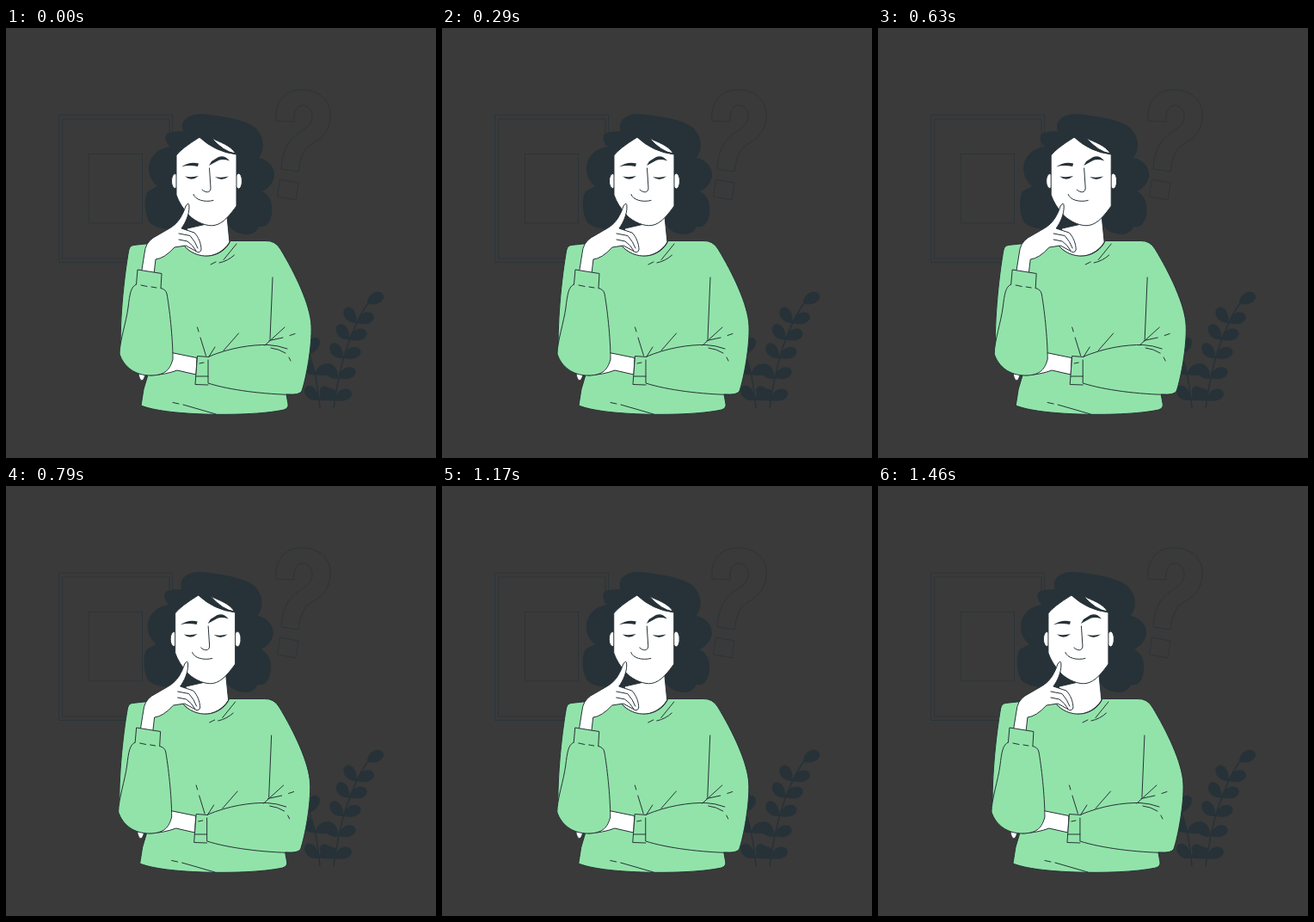
These frames come from a looping animation (500 by 500 pixels, 1.5 s). An HTML page:

```html
<!DOCTYPE html>
<html lang="en">
<head>
<meta charset="utf-8">
<title>Thinking</title>
<style>
html, body { margin: 0; height: 100%; overflow: hidden; background: #3a3a3a; }
svg { display: block; width: 100%; height: 100%; }
.back { fill: none; stroke: #263238; stroke-width: .7; }
.stem { fill: none; stroke: #263238; stroke-width: 1.5; }
.dark { fill: #263238; }
.skin { fill: #fff; }
.knit { fill: #92e3a9; }
.line { fill: none; }
#person { stroke: #263238; stroke-linecap: round; stroke-linejoin: round; }
#person .dark { stroke: none; }
</style>
</head>
<body>
<svg viewBox="0 0 500 500">
  <g class="back">
    <rect x="61.500" y="101" width="132" height="171.500"/>
    <rect x="65.500" y="106" width="124.500" height="162"/>
    <rect x="96.500" y="146.500" width="62" height="80.500"/>
    <path d="M314 108C312 86 324 71 346 72S379 88 377 105S367 128 357 134S343 147 340 167L320 164C321 140 331 128 342 121S357 108 356 101S350 89 344 90S334 97 335 109Z"/>
    <path d="M318.500 176L340 180L337 200L315.500 196Z"/>
  </g>
  <g id="plant" class="dark"></g>
  <g id="person">
    <path class="dark" d="M206 120C201 107 214 99 228 100S281 106 291 117S301 141 294 151C305 153 313 162 312 173Q309 185 298 190C310 196 311 211 308 221Q304 233 294 231C290 240 281 241 273 239Q264 237 258 229L213 234C190 236 174 233 167 226C160 214 161 196 165 190Q170 187 176 184C165 175 163 161 170 150Q178 139 191 138C184 132 184 124 189 122Q196 120 206 120Z"/>
    <path class="skin" d="M211 233L233 228L257 219L260 249C252 262 238 267 226 265Q214 262 207 253Z"/>
    <g class="skin">
      <ellipse cx="196.500" cy="178" rx="4" ry="8.500"/>
      <ellipse cx="270.500" cy="178" rx="4" ry="9"/>
      <path d="M225 127Q204 140 198 148L198 194Q202 206 213 218C221 226 234 231 242 229.500C253 228 262 215 268 207V147Q243 144 225 127Z"/>
      <path d="M239 128C249 133 261 136 267 146Q253 144 239 128Z"/>
    </g>
    <path class="dark" d="M204 161.500Q213 155 224 157.500L223 161Q212 159 204 161.500ZM236 160L239 155L247 150Q254 147 260 154.500Q252 152 247 154ZM208 172.500Q216 174 224 172Q216 179 208 172.500ZM243 173Q251 174.500 259 172.500Q251 179 243 173Z"/>
    <path class="line" d="M236.500 163L238 186C238 192 232 192 228 188M218 193.500C220 200 231 203 241 200.500"/>
    <path class="knit" d="M143 257Q144 253 148 252.500L162 251L207 253C213 261 225 266 236 265S257 257 261 247.500H302Q313 247 319 257C336 285 354 322 355 346S349 407 344 422Q342 427 326 426L328 437Q329 442 323 444C300 449 260 450 230 449S172 445 157 439L160 420L166 400L134 384C131 350 137 290 143 257Z"/>
    <path class="skin" d="M190 377L222 383.500L221 403L199 398Q186 403 168 404ZM154 402C155 409 159 415 162 403Z"/>
    <path class="knit" d="M151.500 298C145 301 144 309 142 325S132 365 132 379C137 394 150 404 168 404S191 396 194 385C194 360 190 325 187 309Q186 304 180 302.500"/>
    <path class="skin" d="M157.500 284L161 262Q162 250 171 244L190 233C201 227 206 216 209 207Q213 201 213 208C213 217 209 226 204 233L219 238C224 243 227 251 227 258Q225 263 220 259L209 253L196 255Q184 268 174 269L172 286Z"/>
    <path class="line" d="M201 239L214 241.500Q220 248 223 256M201 246L211 248Q217 252 221 259"/>
    <path class="knit" d="M151.500 298L153 281L181 285.500L180 302.500"/>
    <path class="knit" d="M236 382.500L222.500 381.500L220 414.500L235 415"/>
    <path class="line" d="M157 299L164 300.500M169 301L175 302M236 382C260 372 285 368 305 368.500Q316 369 327 373M235 386V413C260 421 300 426 335 426.500M221 405H235M225 390L230 389"/>
    <path class="line" d="M310 290L307 362M301 369L324 348M306 363.500L322 360M330 357.500L336 355.500M308 372Q317 373 325 378M329 383L331 387M222.500 348L224 353M226 360L232.500 381M236 382L243 371M253 375L270.500 355M268 251L253 269.500M265.500 264Q258 271 248 273M238 275L244 272M194 435.500L201 437M206 438L244 449"/>
  </g>
</svg>
<script>
const plant = document.getElementById("plant");
const person = document.getElementById("person");

function addPath(attributes) {
  const path = document.createElementNS("http://www.w3.org/2000/svg", "path");
  for (const name in attributes) path.setAttribute(name, attributes[name]);
  plant.append(path);
}

function leaf([x, y], angle) {
  addPath({
    d: "M0 0C5-8 14-9 19-5C23-2 22 4 18 5C12 8 5 4 0 0Z",
    transform: `translate(${x} ${y}) rotate(${angle})`
  });
}

// A curved stem with evenly spaced pairs of leaves and one at the tip
function sprig(start, bend, end, pairs, first, gap, tipAngle) {
  const at = t => start.map((s, k) =>
    (1 - t) ** 2 * s + 2 * t * (1 - t) * bend[k] + t * t * end[k]);
  addPath({ class: "stem", d: `M${start}Q${bend} ${end}` });
  for (let i = 0; i < pairs; i++) {
    const t = first + i * gap;
    leaf(at(t), -137 + 14 * t);
    leaf(at(t), -28 + 6 * t);
  }
  leaf(end, tipAngle);
}

sprig([381, 442], [391, 365], [420, 321], 5, .059, .178, -31);
sprig([365, 442], [362, 405], [353, 380], 2, .13, .45, -66);

const LOOP = 1500, STEPS = 36;
// Sideways swings at each tenth of the loop, mirrored after the middle
const SWINGS = [0, -1, 2, -4, 4, -4];
const swing = i => SWINGS[Math.min(i, 10 - i)];

const bezier = (a, b, s) => 3 * (1 - s) ** 2 * s * a + 3 * (1 - s) * s * s * b + s ** 3;

// cubic-bezier(.36, .07, .19, .97)
function ease(x) {
  let low = 0, high = 1;
  for (let i = 0; i < 20; i++) {
    const mid = (low + high) / 2;
    if (bezier(.36, .19, mid) < x) low = mid; else high = mid;
  }
  return bezier(.07, .97, low);
}

function offset(time) {
  const step = Math.floor((time % LOOP + 9) * STEPS / LOOP) % STEPS;
  const pos = Math.max(0, step / STEPS - .002) * 10;
  const i = Math.floor(pos);
  return swing(i) + (swing(i + 1) - swing(i)) * ease(pos - i);
}

function draw() {
  person.setAttribute("transform", `translate(${offset(performance.now()).toFixed(3)} 0)`);
  requestAnimationFrame(draw);
}
draw();
</script>
</body>
</html>
```
